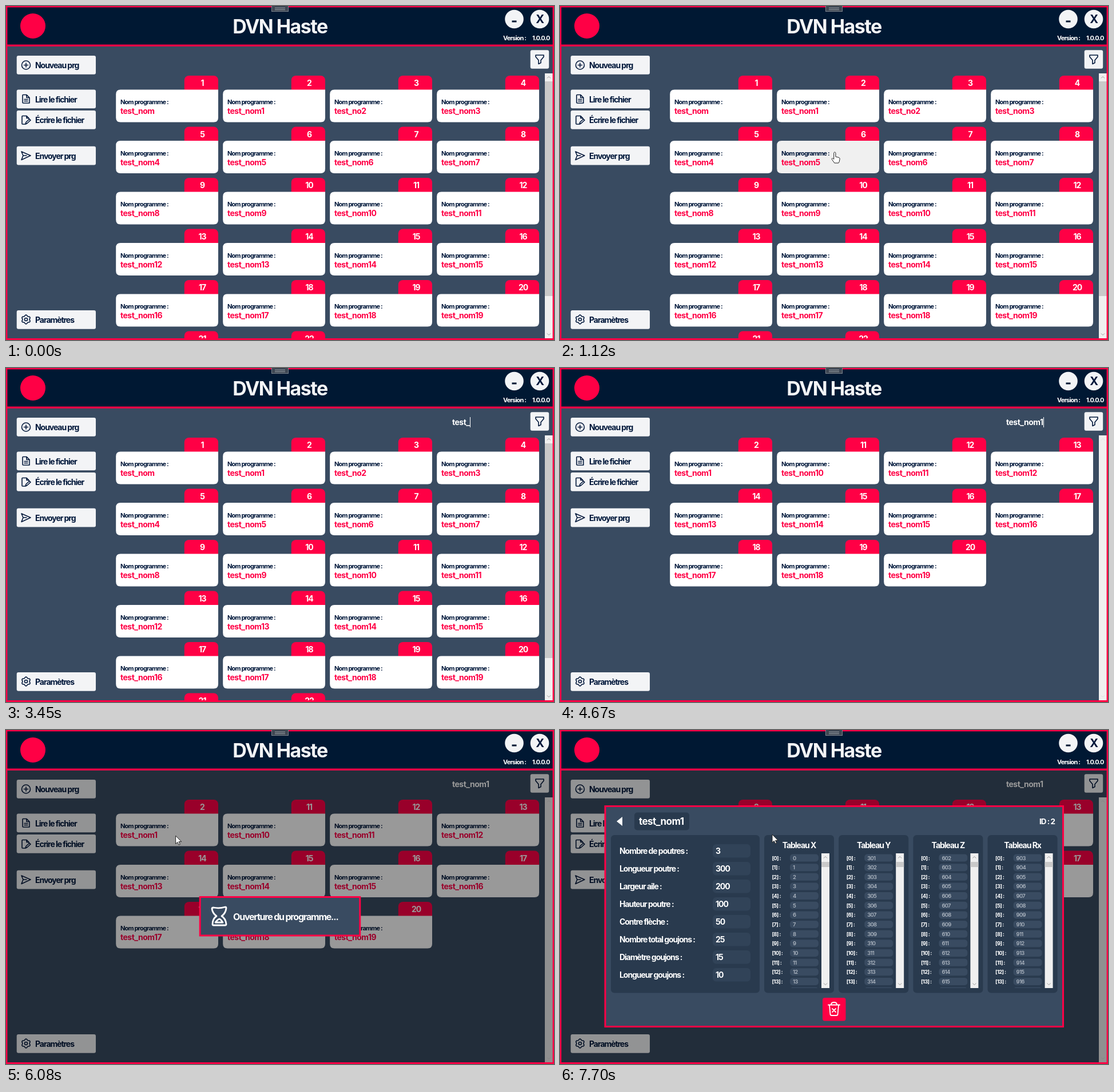
Write an HTML page that moves like this. It is 958 px wide and 585 px high and loops after 8 s.

```html
<!DOCTYPE html>
<html lang="fr">
<head>
<meta charset="utf-8">
<style>
  html, body { margin: 0; width: 100%; height: 100%; overflow: hidden; background: #394b61; }
  svg { display: block; width: 958px; height: 585px; }
  text { font: 700 14px Inter, "Liberation Sans", sans-serif; letter-spacing: -.075em; fill: #fff; white-space: pre; }
  .dark { fill: #00173a; }
  .name { letter-spacing: -.035em; }
  .red { fill: #ff0045; }
  .mid { text-anchor: middle; }
  .icon { fill: none; stroke: #00173a; stroke-width: 1.6; stroke-linejoin: round; stroke-linecap: round; }
  .white { stroke: #fff; }
</style>
</head>
<body>
<svg viewBox="0 0 958 585">
  <defs>
    <clipPath id="listClip"><rect y="118" width="958" height="464"/></clipPath>
    <clipPath id="tableClip"><rect y="216" width="958" height="236"/></clipPath>
  </defs>
  <rect width="958" height="585" fill="#394b61"/>
  <g id="menu"></g>
  <g id="list" clip-path="url(#listClip)"></g>
  <text id="query" class="name" x="780" y="100"></text>
  <rect id="caret" y="86" width="1" height="18" fill="#fff"/>
  <g id="overlay"></g>
  <g id="header"></g>
  <path id="cursor" stroke-linejoin="round"/>
</svg>
<script>
const LOOP = 8000, RED = '#ff0045', LIGHT = '#f3f4f6', NAVY = '#001833', SLATE = '#394b61', INK = '#293a4e';
const CLICK = 6010, DIM = 6080, OPEN = 7150, FOCUS = 2390;
const KEYS = [2990, 3120, 3200, 3270, 3440, 3730, 3800, 4070, 4600];
const WORD = 'test_nom1';
const PATH = [
  [380, 764, 576], [600, 655, 525], [910, 578, 293], [980, 513, 264], [1120, 480, 256],
  [1190, 500, 254], [1460, 587, 246], [1650, 612, 182], [1930, 784, 112], [2060, 786, 106],
  [5200, 783, 112], [5400, 650, 155], [5650, 400, 178], [5940, 296, 185], [6080, 296, 185],
  [6410, 497, 241], [6810, 497, 241], [7010, 416, 219], [7150, 405, 212], [7700, 371, 183]
];
const SHAPES = {
  arrow: 'M0 0V14.2l3.3-3 2.1 4.9 2.2-1-2.1-4.7h4.6z',
  hand: 'M0 0c1.2 0 1.6.8 1.6 1.8V8l5 1.2c1.7.5 2.4 1.3 2.2 3l-.9 4.5-1.3 2.3H-.5L-5 12.6c-.8-1.4.8-2.6 2-1.6l1.4 1.4V1.8C-1.6.8-1.2 0 0 0z',
  beam: 'M-3-8h2l1 1 1-1h2M0-7V7M-3 8h2l1-1 1 1h2'
};
const programs = Array.from({ length: 22 }, (_, i) =>
  ({ id: i + 1, name: i === 2 ? 'test_no2' : 'test_nom' + (i || '') }));

const $ = id => document.getElementById(id);
const times = (n, fn) => Array.from({ length: n }, (_, i) => fn(i)).join('');
const rect = (x, y, w, h, fill, r = 0, more = '') =>
  `<rect x="${x}" y="${y}" width="${w}" height="${h}" rx="${r}" fill="${fill}" ${more}/>`;
const text = (x, y, s, cls = '', size = 14, more = '') =>
  `<text x="${x}" y="${y}" class="${cls}" style="font-size:${size}px;${more}">${s}</text>`;
const icon = (d, cls = '', width = 1.6) => `<path class="icon ${cls}" style="stroke-width:${width}" d="${d}"/>`;
const framed = (x, y, w, h) => rect(x, y, w, h, SLATE, 0, `stroke="${RED}" stroke-width="3"`);

function scrollbar(x, y, h, thumbY, thumbH, ink = '#999') {
  const chevron = (cy, d) => `<path d="M${x + 4} ${cy + d}l3 ${-2 * d} 3 ${2 * d}" fill="none" stroke="${ink}"/>`;
  return rect(x, y, 14, h, '#f0f0f0') + rect(x, thumbY, 14, thumbH, '#c9c9c9') +
    chevron(y + 7, 1.5) + chevron(y + h - 7, -1.5);
}

function gear(cx, cy) {
  const points = Array.from({ length: 48 }, (_, i) => {
    const a = i * Math.PI / 24, r = 7 + .9 * Math.cos(6 * a);
    return `${(cx + r * Math.sin(a)).toFixed(2)} ${(cy - r * Math.cos(a)).toFixed(2)}`;
  });
  return `M${points.join('L')}zM${cx - 2.5} ${cy}a2.5 2.5 0 1 0 5 0a2.5 2.5 0 1 0-5 0`;
}

function menu() {
  const buttons = [
    [87, 'Nouveau prg', 'M27.5 103.5a7.5 7.5 0 1 0 15 0a7.5 7.5 0 1 0-15 0M35 100v7M31.5 103.5h7'],
    [146.5, 'Lire le fichier', 'M30 155.5h6l5 5v9.5h-11q-1 0-1-1v-12.5q0-1 1-1zM36 155.5v5h5M32 163.5h6M32 166.5h6'],
    [183, 'Écrire le fichier', 'M33 207h-4q-1 0-1-1v-12.5q0-1 1-1h7l4 4v1M36 192.5v4h4M34 207l1-3.5 6-5.5 2 2-6 5.5z'],
    [245.7, 'Envoyer prg', 'M27 255l16 7-16 7.5 3-7.5zM30 262h6'],
    [533, 'Paramètres', gear(35, 549)]
  ];
  return buttons.map(([y, label, d]) =>
    rect(18.7, y, 138.3, 32.7, LIGHT, 3) + icon(d) + text(51, y + 22, label, 'dark')).join('') +
    rect(916.7, 77.3, 32.5, 32.5, LIGHT, 3) + icon('M926 86h14v3l-5 6v4.5l-4 2v-6.5l-5-6z');
}

function header() {
  return rect(0, 0, 958, 68, NAVY) + rect(0, 67.5, 958, 3.3, RED) +
    `<circle cx="47" cy="35" r="22" fill="${RED}"/>` +
    text(479, 48, 'DVN Haste', 'mid', 34, 'letter-spacing:-.045em;fill:' + LIGHT) +
    `<circle cx="888.5" cy="23" r="16.3" fill="${LIGHT}"/><circle cx="933" cy="23" r="16.3" fill="${LIGHT}"/>` +
    rect(884.5, 25.5, 8, 3, NAVY) + text(933, 30, 'X', 'mid dark', 20) +
    text(869, 60, 'Version :', '', 11) + text(920, 60, '1.0.0.0', '', 11) +
    rect(0, 0, 958, 2.4, RED) + rect(0, 0, 2.4, 585, RED) + rect(955.6, 0, 2.4, 585, RED) + rect(0, 582, 958, 3, RED) +
    rect(464.5, -1, 29, 10.5, '#3e4753', 0, 'stroke="#7b838c"') +
    '<path d="M470 3.5h18M470 6.5h18" stroke="#a4a9af"/>';
}

const cell = i => ({ x: 192.2 + i % 4 * 187, y: 146.6 + Math.floor(i / 4) * 89.5 });

function card({ id, name }, i, hover) {
  const { x, y } = cell(i);
  return rect(x + 119.6, y - 24.6, 59.2, 36, RED, 8) +
    `<path d="M${x + 8} ${y}h170.800v49q0 8-8 8h-162.800q-8 0-8-8v-41q0-8 8-8z" fill="${hover ? '#f0f0f0' : '#fff'}"/>` +
    text(x + 150.8, y - 6.6, id, 'mid') + text(x + 7.8, y + 25.4, 'Nom programme :', 'dark', 11) +
    text(x + 7.8, y + 42.4, name, 'name red');
}

const dim = rect(2, 71, 954, 511, '#000', 0, 'opacity=".4"');
const loading = dim + framed(339.2, 292.5, 279.6, 67.5) +
  icon('M363 311q10 2 20-1q2 0 2 2q-1 9-8 14q7 4 8 14q0 2-2 2h-20q-2 0-2-2q0-9 7-14q-7-5-8-13q0-2 3-2zM366 337q5-6 7-6t6 6z', 'white', 2.8) +
  text(397, 332.5, 'Ouverture du programme...', '', 16);

function table(axis, n) {
  const x = 357 + n * 130.2;
  const rows = times(15, i => {
    const y = 224 + i * 16.65;
    return text(x + 13.5, y + 3.5, `[${i}] :`, '', 9.5) + rect(x + 45, y - 6.5, 50, 13, SLATE, 5) +
      text(x + 50, y + 3.5, n * 301 + i, '', 9.5, 'font-weight:600;fill:#aab3be');
  });
  return rect(x, 184, 122, 276.5, INK, 6) + text(x + 61, 206.5, 'Tableau ' + axis, 'mid') +
    `<g clip-path="url(#tableClip)">${rows}</g>` + scrollbar(x + 100, 216, 236, 231, 9);
}

function details() {
  const fields = [
    ['Nombre de poutres', 3], ['Longueur poutre', 300], ['Largeur aile', 200], ['Hauteur poutre', 100],
    ['Contre flèche', 50], ['Nombre total goujons', 25], ['Diamètre goujons', 15], ['Longueur goujons', 10]
  ];
  return dim + framed(79, 133.5, 800.5, 386) +
    '<path d="M109 152v16l-10-8z" fill="#fff"/>' +
    rect(130, 144.5, 96, 31, INK, 5) + text(138, 166, WORD, 'name', 17) + text(838, 165, 'ID : 2', '', 13.5) +
    rect(89, 184, 260, 276.5, INK, 6) +
    fields.map(([label, value], i) => text(104, 217 + i * 31, label + ' :') +
      rect(267, 200 + i * 31, 66, 23.5, '#314358', 6) + text(272, 217 + i * 31, value)).join('') +
    ['X', 'Y', 'Z', 'Rx'].map(table).join('') +
    rect(459, 469, 40.5, 40.5, RED, 4) +
    icon('M469 481.5h20M474 481q0-4 5-4t5 4M471 482l1.5 16q.3 2 2.5 2h8q2.2 0 2.5-2l1.5-16M476 488l6 6M482 488l-6 6', 'white', 1.8);
}

function pointer(t) {
  const next = PATH.findIndex(p => p[0] > t);
  if (next < 1) return next ? PATH[PATH.length - 1].slice(1) : [-50, -50];
  const [t0, x0, y0] = PATH[next - 1], [t1, x1, y1] = PATH[next];
  const k = (t - t0) / (t1 - t0);
  return [x0 + (x1 - x0) * k, y0 + (y1 - y0) * k];
}

// Touch the DOM only when the markup differs.
const shown = {};
function put(id, markup) {
  if (shown[id] !== markup) $(id).innerHTML = shown[id] = markup;
}

const DETAILS = details();
put('menu', menu());
put('header', header());

function draw(now) {
  const t = now % LOOP;
  const pressed = KEYS.filter(k => k <= t);
  const query = WORD.slice(0, pressed.length);
  const visible = programs.filter(p => p.name.includes(query));
  const [px, py] = pointer(t);
  const mouse = t >= 380 && (t < 2920 || t >= 5200);
  const hit = mouse && t < DIM ? visible.findIndex((_, i) => {
    const { x, y } = cell(i);
    return px >= x && px <= x + 179 && py >= y && py <= y + 57;
  }) : -1;

  const full = visible.length > 16;
  put('list', visible.map((p, i) => card(p, i, i === hit)).join('') +
    scrollbar(942, 118, 464, 132, full ? 376 : 0, full ? '#999' : '#ddd'));
  put('query', query);
  put('overlay', t < DIM ? '' : t < OPEN ? loading : DETAILS);

  const last = pressed.length ? pressed[pressed.length - 1] : FOCUS;
  const blink = t >= FOCUS && t < CLICK && Math.floor((t - last) / 530) % 2 === 0;
  const caret = $('caret');
  caret.setAttribute('x', Math.round(780 + (query ? $('query').getComputedTextLength() : 0)));
  caret.setAttribute('visibility', blink ? 'visible' : 'hidden');

  const shape = hit >= 0 && t < CLICK ? 'hand' : px > 770 && py < 118 ? 'beam' : 'arrow';
  const cursor = $('cursor');
  cursor.setAttribute('d', SHAPES[shape]);
  cursor.setAttribute('fill', shape === 'beam' ? 'none' : '#fff');
  cursor.setAttribute('stroke', shape === 'beam' ? '#dfe3e8' : '#222');
  cursor.setAttribute('transform', `translate(${px.toFixed(1)} ${py.toFixed(1)})`);
  cursor.setAttribute('visibility', mouse ? 'visible' : 'hidden');
}

function frame() {
  draw(performance.now());
  requestAnimationFrame(frame);
}
frame();
</script>
</body>
</html>
```
